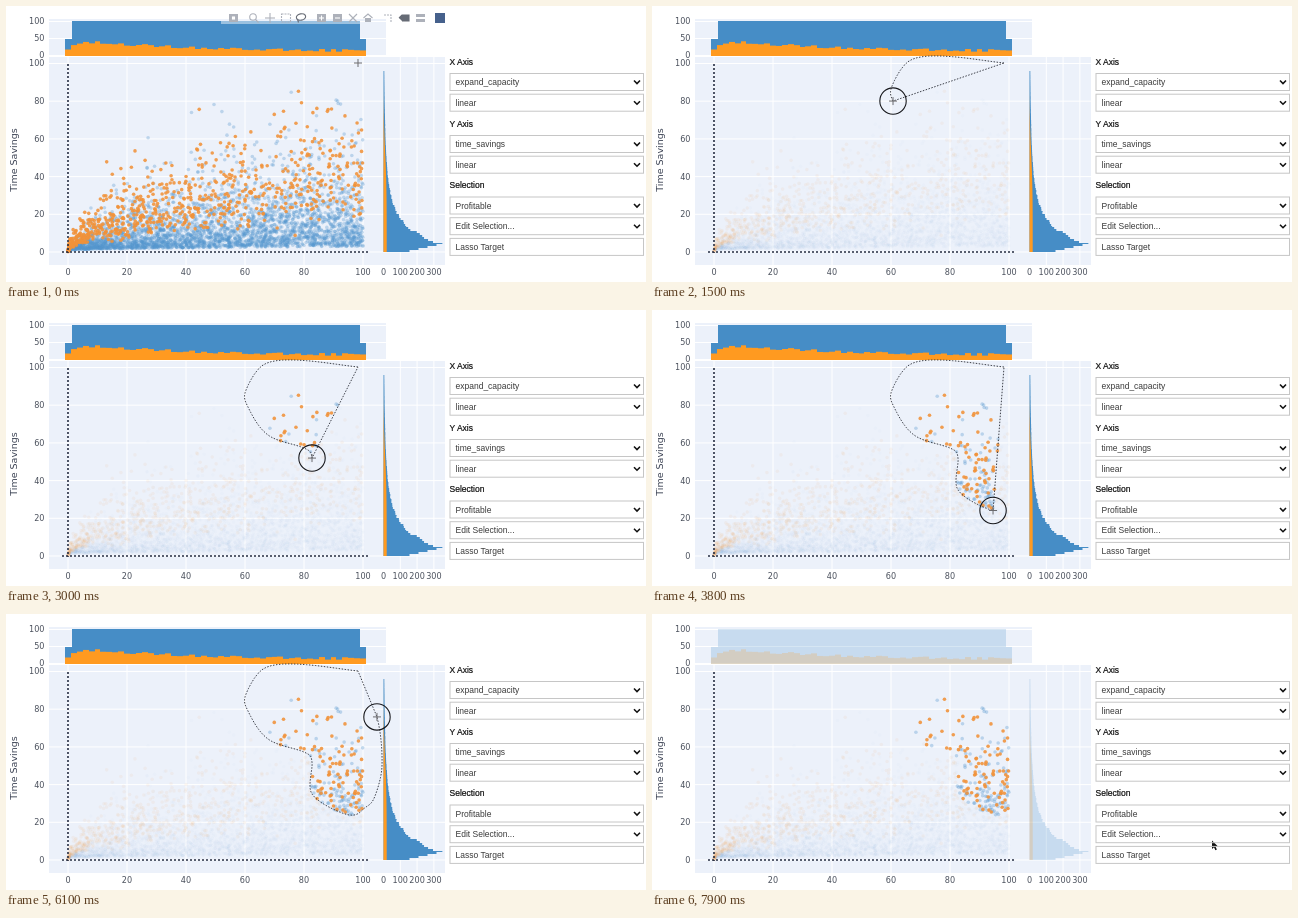
An HTML page with a canvas that plays this animation: 640x276 px, repeating every 8000 ms.

```html
<!DOCTYPE html>
<html lang="en">
<head>
<meta charset="utf-8">
<title>Lasso selection</title>
<style>
  html, body { margin: 0; width: 640px; height: 276px; overflow: hidden; background: #fff; }
  canvas, svg { position: absolute; left: 0; top: 0; }
  .tick { font: 8.1px "DejaVu Sans", sans-serif; fill: #4a505c; }
  .title { font: 9.5px "DejaVu Sans", sans-serif; fill: #3c4354; }
  .field { font: 8.5px "Liberation Sans", Arial, sans-serif; fill: #3a3a3a; }
  .head { font: 8.5px "Liberation Sans", Arial, sans-serif; fill: #111; stroke: #111; stroke-width: .2px; }
</style>
</head>
<body>
<canvas id="plot" width="640" height="276"></canvas>
<svg id="labels" width="640" height="276"></svg>
<script>
const LOOP = 8000, PRESS = 200, RELEASE = 6700, LEAVE = 6900, ARRIVE = 7600;
const BLUE = '#468dc6', ORANGE = '#ff9a20', DOT_BLUE = '#5496cc', DOT_ORANGE = '#f0923a';
const ctx = document.getElementById('plot').getContext('2d');
const px = v => 62 + v * 2.95;
const py = v => 246 - v * 1.885;
const countX = v => 377.5 + v * 0.168;
const countY = v => 49.5 - v * 0.34;

let seed = 71;
function rand() {
  seed = (seed * 1664525 + 1013904223) % 4294967296;
  return seed / 4294967296;
}
const gauss = () => Math.sqrt(-2 * Math.log(rand() + 1e-9)) * Math.cos(2 * Math.PI * rand());

// Labels and controls
let markup = '';
function text(x, y, str, cls = 'tick', anchor = 'middle', extra = '') {
  markup += `<text class="${cls}" x="${x}" y="${y}" text-anchor="${anchor}" ${extra}>${str}</text>`;
}
for (let v = 0; v <= 100; v += 20) {
  text(px(v), 268.5, v);
  text(38.5, py(v) + 2.9, v, 'tick', 'end');
}
for (let v = 0; v <= 100; v += 50) text(38.5, countY(v) + 2.6, v, 'tick', 'end');
for (let v = 0; v <= 300; v += 100) text(countX(v), 268.5, v);
text(0, 0, 'Time Savings', 'title', 'middle', 'transform="translate(11 154) rotate(-90)"');

function group(y, head, ...fields) {
  text(443.5, y + 3, head, 'head', 'start');
  fields.forEach((label, i) => {
    const mid = y + 20.5 + i * 20.7;
    markup += `<rect x="444" y="${mid - 8.5}" width="193.5" height="17" fill="none" stroke="#c6c6c6"/>`;
    text(449.5, mid + 3, label, 'field', 'start');
    if (label !== 'Lasso Target') {
      markup += `<path d="M628 ${mid - 1.5}l3 3l3-3" fill="none" stroke="#111" stroke-width="1.6"/>`;
    }
  });
}
group(55.5, 'X Axis', 'expand_capacity', 'linear');
group(117.5, 'Y Axis', 'time_savings', 'linear');
group(179, 'Selection', 'Profitable', 'Edit Selection...', 'Lasso Target');
document.getElementById('labels').innerHTML = markup;

// Scatter data: exponential spread for blue, log-normal spread for orange
const points = [];
function add(x, y, hot) {
  if (y < 88) points.push({ x: px(x), y: py(y), hot });
}
for (let i = 0; i < 3300; i++) {
  const x = 100 * rand(), s = (x / 100) ** 0.6;
  add(x, 1 + 2 * s - 17 * s * Math.log(1 - rand()), false);
}
for (let i = 0; i < 740; i++) {
  const x = 100 * rand() ** 1.5;
  add(x, 4.1 * Math.sqrt(x) * Math.exp(0.4 * gauss()), true);
}

function dot(c, p, blueAlpha, hotAlpha) {
  c.globalAlpha = p.hot ? hotAlpha : blueAlpha;
  c.fillStyle = p.hot ? DOT_ORANGE : DOT_BLUE;
  c.beginPath();
  c.arc(p.x, p.y, 1.8, 0, 7);
  c.fill();
  c.globalAlpha = 1;
}
function scatterLayer(blueAlpha, hotAlpha) {
  const layer = document.createElement('canvas');
  layer.width = 640;
  layer.height = 276;
  const c = layer.getContext('2d');
  for (const p of points) dot(c, p, blueAlpha, hotAlpha);
  return layer;
}
const fullLayer = scatterLayer(0.32, 0.88);
const dimLayer = scatterLayer(0.02, 0.065);

// Histogram data
const shares = Array.from({ length: 51 }, (_, i) =>
  (7 + 36 * Math.exp(-i / 20)) * (1 - 0.6 * Math.exp(-i / 1.5)) + 8 * rand());
const rows = Array.from({ length: 96 }, (_, i) => ({
  all: i < 4 ? 26 + 9 * i : (42 * Math.exp((4 - i) / 8) + 14 * Math.exp((4 - i) / 26)) * (0.93 + 0.14 * rand()) + 0.4,
  hot: 3.2 * Math.exp(-((i / 58) ** 4))
}));

function fillBox(x1, y1, x2, y2) {
  ctx.fillRect(x1, y1, x2 - x1, y2 - y1);
}
function histograms(alpha) {
  const rowTop = i => Math.round(py(i + 1));
  ctx.globalAlpha = alpha;
  ctx.fillStyle = BLUE;
  fillBox(59, 33, 360, 50);
  fillBox(66, 15, 354, 33);
  rows.forEach((r, i) => fillBox(377.5, rowTop(i), 377.5 + r.all, rowTop(i - 1)));
  ctx.fillStyle = ORANGE;
  shares.forEach((s, i) => fillBox(Math.round(59 + i * 5.9), countY(s), Math.round(64.9 + i * 5.9), 50));
  rows.forEach((r, i) => fillBox(377.5, rowTop(i), 377.5 + Math.min(r.hot, r.all), rowTop(i - 1)));
  ctx.globalAlpha = 1;
}

function line(...xy) {
  ctx.beginPath();
  for (let i = 0; i < xy.length; i += 2) ctx.lineTo(xy[i], xy[i + 1]);
  ctx.stroke();
}

function background() {
  ctx.fillStyle = '#fff';
  ctx.fillRect(0, 0, 640, 276);
  ctx.fillStyle = '#ecf1fa';
  fillBox(43, 13, 380, 50);
  fillBox(43, 51, 439, 259);
  ctx.strokeStyle = '#fff';
  ctx.lineWidth = 1;
  for (let v = 0; v <= 100; v += 20) {
    line(px(v), 51, px(v), 259);
    line(43, py(v), 439, py(v));
  }
  for (let v = 0; v <= 100; v += 50) line(43, countY(v), 380, countY(v));
  for (let v = 100; v <= 300; v += 100) line(countX(v), 51, countX(v), 259);
}

function zeroLines() {
  ctx.strokeStyle = '#252c42';
  ctx.lineWidth = 1.6;
  ctx.setLineDash([2, 2]);
  line(62, 58, 62, 247);
  line(56, 246, 363, 246);
  ctx.setLineDash([]);
}

// Time, x, y of the pointer while it draws the lasso
const track = [
  [PRESS, 352, 57], [800, 287, 50], [1030, 257, 55], [1250, 240, 80], [1500, 241, 95],
  [2100, 262, 125], [2700, 300, 139], [3000, 306, 148], [3350, 306, 180], [3800, 341, 200.5],
  [4600, 360, 193], [5100, 369, 182], [5500, 376, 152], [6100, 371, 103], [RELEASE, 352, 57]
];
// Smooth curve through the track, with slopes from the neighbouring points
function pointerAt(t) {
  const last = track.length - 1;
  const i = Math.max(0, Math.min(last - 1, track.findIndex(p => p[0] > t) - 1));
  const a = track[i], b = track[i + 1], before = track[Math.max(0, i - 1)], after = track[Math.min(last, i + 2)];
  const span = b[0] - a[0], k = (t - a[0]) / span;
  return [1, 2].map(c => {
    const m0 = (b[c] - before[c]) / (b[0] - before[0]) * span;
    const m1 = (after[c] - a[c]) / (after[0] - a[0]) * span;
    const e = k * k * (3 - 2 * k);
    return a[c] * (1 - e) + b[c] * e + k * (1 - k) * ((1 - k) * m0 - k * m1);
  });
}
function lassoPath(end) {
  const path = new Path2D();
  for (let t = PRESS; t < end; t += 40) path.lineTo(...pointerAt(t));
  path.lineTo(...pointerAt(end));
  path.closePath();
  return path;
}

function toolbar() {
  const light = '#adb1ba', dark = '#666b75';
  ctx.fillStyle = 'rgba(255,255,255,.45)';
  fillBox(215, 15, 354, 18);
  ctx.lineWidth = 1.1;
  ctx.fillStyle = ctx.strokeStyle = light;
  for (const x of [223, 311, 327]) ctx.fillRect(x, 8, 9, 8);
  for (const y of [8, 13]) ctx.fillRect(410, y, 9, 3);
  ctx.fillRect(359, 12, 6, 4);
  ctx.beginPath();
  ctx.arc(247, 11, 3.3, 0, 7);
  ctx.stroke();
  line(249.5, 13.5, 252.5, 16.5);
  line(259, 12, 269, 12);
  line(264, 7, 264, 17);
  line(343, 8, 351, 16);
  line(351, 8, 343, 16);
  line(357.5, 12, 362, 8, 366.5, 12);
  ctx.setLineDash([2, 1]);
  ctx.strokeRect(275.5, 8, 9, 8);
  line(378, 9, 385, 9, 385, 16);
  ctx.setLineDash([]);
  ctx.strokeStyle = '#fff';
  line(313, 12, 318, 12);
  line(315.5, 9.5, 315.5, 14.5);
  line(329, 12, 334, 12);
  ctx.strokeRect(226.5, 11, 2, 2);
  ctx.fillStyle = ctx.strokeStyle = dark;
  ctx.beginPath();
  ctx.ellipse(295, 11, 4.7, 3.2, -0.2, 0, 7);
  ctx.stroke();
  line(291.5, 13, 292.5, 16.5);
  line(393, 12, 396, 9, 403, 9, 403, 15, 396, 15);
  ctx.fill();
  ctx.fillStyle = '#46618c';
  ctx.fillRect(429, 7, 10, 10);
}

function crosshair(x, y) {
  ctx.strokeStyle = '#6a6a6e';
  ctx.lineWidth = 1;
  line(x - 4, y, x + 4, y);
  line(x, y - 4, x, y + 4);
}

const arrowShape = new Path2D('M0 0v8.5l2-1.7l1.4 3l1.5-.7l-1.4-2.9l2.5-.2z');
function arrow(x, y) {
  ctx.save();
  ctx.translate(x, y);
  ctx.fillStyle = '#111';
  ctx.strokeStyle = '#fff';
  ctx.lineWidth = 0.8;
  ctx.stroke(arrowShape);
  ctx.fill(arrowShape);
  ctx.restore();
}

function draw(t) {
  const dragging = t >= PRESS && t < RELEASE;
  const end = Math.max(PRESS, Math.min(RELEASE - 1, t));
  let [x, y] = pointerAt(end);

  background();
  histograms(t < RELEASE + 100 ? 1 : 0.22);
  if (t < PRESS) {
    ctx.drawImage(fullLayer, 0, 0);
  } else {
    ctx.drawImage(dimLayer, 0, 0);
    const lasso = lassoPath(end);
    for (const p of points) {
      if (ctx.isPointInPath(lasso, p.x, p.y)) dot(ctx, p, 0.32, 0.88);
    }
    if (dragging) {
      ctx.strokeStyle = '#3c3f48';
      ctx.lineWidth = 1;
      ctx.setLineDash([1.5, 1.5]);
      ctx.stroke(lasso);
      ctx.setLineDash([]);
    }
  }
  zeroLines();

  if (t > LEAVE) {
    const k = Math.min(1, (t - LEAVE) / (ARRIVE - LEAVE)), ease = k * k * (3 - 2 * k);
    x += (560 - x) * ease;
    y += (226.5 - y) * ease;
  }
  const inPlot = x < 439;
  if (inPlot && !dragging) toolbar();
  (inPlot ? crosshair : arrow)(x, y);
  if (dragging) {
    ctx.strokeStyle = '#17181c';
    ctx.lineWidth = 1.1;
    ctx.beginPath();
    ctx.arc(x, y, 13.2, 0, 7);
    ctx.stroke();
  }
}

const begin = performance.now();
function tick() {
  draw((performance.now() - begin) % LOOP);
  requestAnimationFrame(tick);
}
tick();
</script>
</body>
</html>
```
